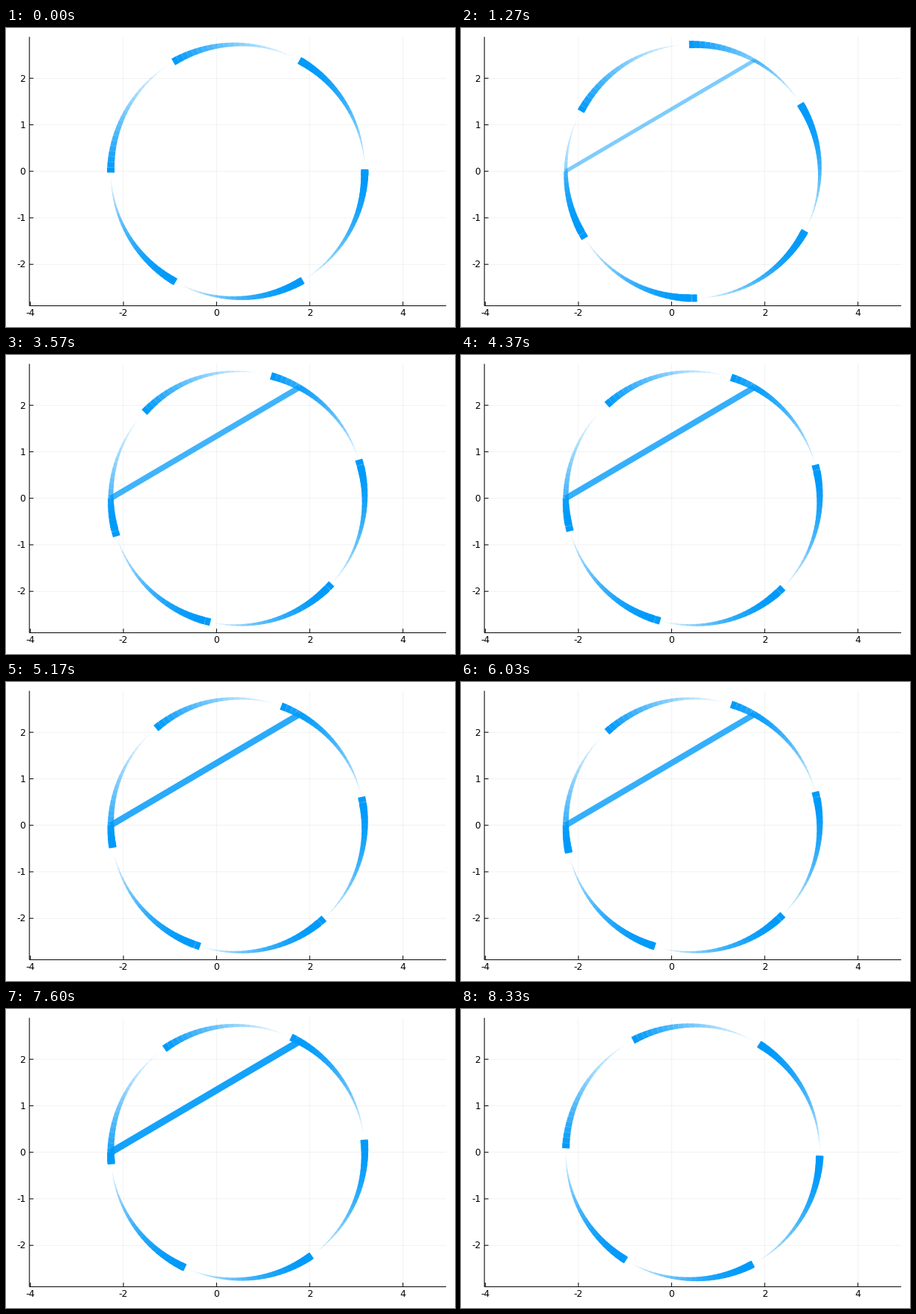
A matplotlib script that plays this animation: 600x400 px, repeating every 8360 ms.

```python
import numpy as np
import matplotlib.pyplot as plt
from matplotlib.animation import FuncAnimation
from matplotlib.collections import LineCollection

W, H, DPI = 600, 400, 100
LOOP_MS = 8360
N = 251                 # points on the path, one frame per starting point
TAIL = 25               # segments in one fading tail
UNIT = 62.24            # pixels per axis unit
X0, Y0 = 281.4, 191.7   # pixel position of the axis origin
LEFT, RIGHT, TOP, BOTTOM = 31.2, 588.19, 11.81, 371.6
BLUE = (0, 0.6056, 0.9787)
PT = 72 / DPI           # points per pixel

plt.rcParams["font.family"] = "DejaVu Sans"
fig = plt.figure(figsize=(W / DPI, H / DPI), dpi=DPI, facecolor="white")
ax = fig.add_axes([0, 0, 1, 1])
ax.set(xlim=(0, W), ylim=(H, 0))
ax.axis("off")


def line(xs, ys, width=1.0, alpha=1.0, z=3):
    ax.plot(xs, ys, color="black", alpha=alpha, lw=width * PT, zorder=z,
            solid_capstyle="butt", snap=False)


def grid(xs, ys):
    line(xs, ys, 0.5, 0.1, 1)


def label(x, y, value, align):
    ax.text(x, y, str(value), fontsize=8.8, ha=align, va="baseline")


for v in range(-4, 5, 2):
    x = X0 + v * UNIT
    grid([x, x], [TOP, BOTTOM])
    line([x, x], [BOTTOM, BOTTOM - 5.5])
    label(x, 385, v, "center")
for v in range(-2, 3):
    y = Y0 - v * UNIT
    grid([LEFT, RIGHT], [y, y])
    line([LEFT, LEFT + 5.5], [y, y])
    label(26.3, y + 4.3, v, "right")
line([LEFT, RIGHT], [BOTTOM, BOTTOM])
line([LEFT, LEFT], [TOP, BOTTOM])

# One and two-thirds turns counterclockwise, with a 3% margin inside the axes
theta = np.radians(180 + np.linspace(0, 601, N))
radius = (BOTTOM - TOP) / 2 / 1.06
path = np.column_stack([(LEFT + RIGHT) / 2 + radius * np.cos(theta),
                        (TOP + BOTTOM) / 2 - radius * np.sin(theta)])

# Width and opacity ramp up together and restart with every tail
ramp = (np.arange(N - 1) % TAIL) / (TAIL - 1)
colors = [(*BLUE, a) for a in ramp]
trail = LineCollection([], linewidths=10 * PT * ramp, colors=colors,
                       capstyle="butt", snap=False, zorder=2)
ax.add_collection(trail, autolim=False)


def draw(k):
    pts = np.roll(path, -k, axis=0)
    trail.set_segments(np.stack([pts[:-1], pts[1:]], axis=1))
    return trail,


anim = FuncAnimation(fig, draw, frames=N, interval=LOOP_MS / N,
                     repeat=True, repeat_delay=0, blit=False)
plt.show()
```
